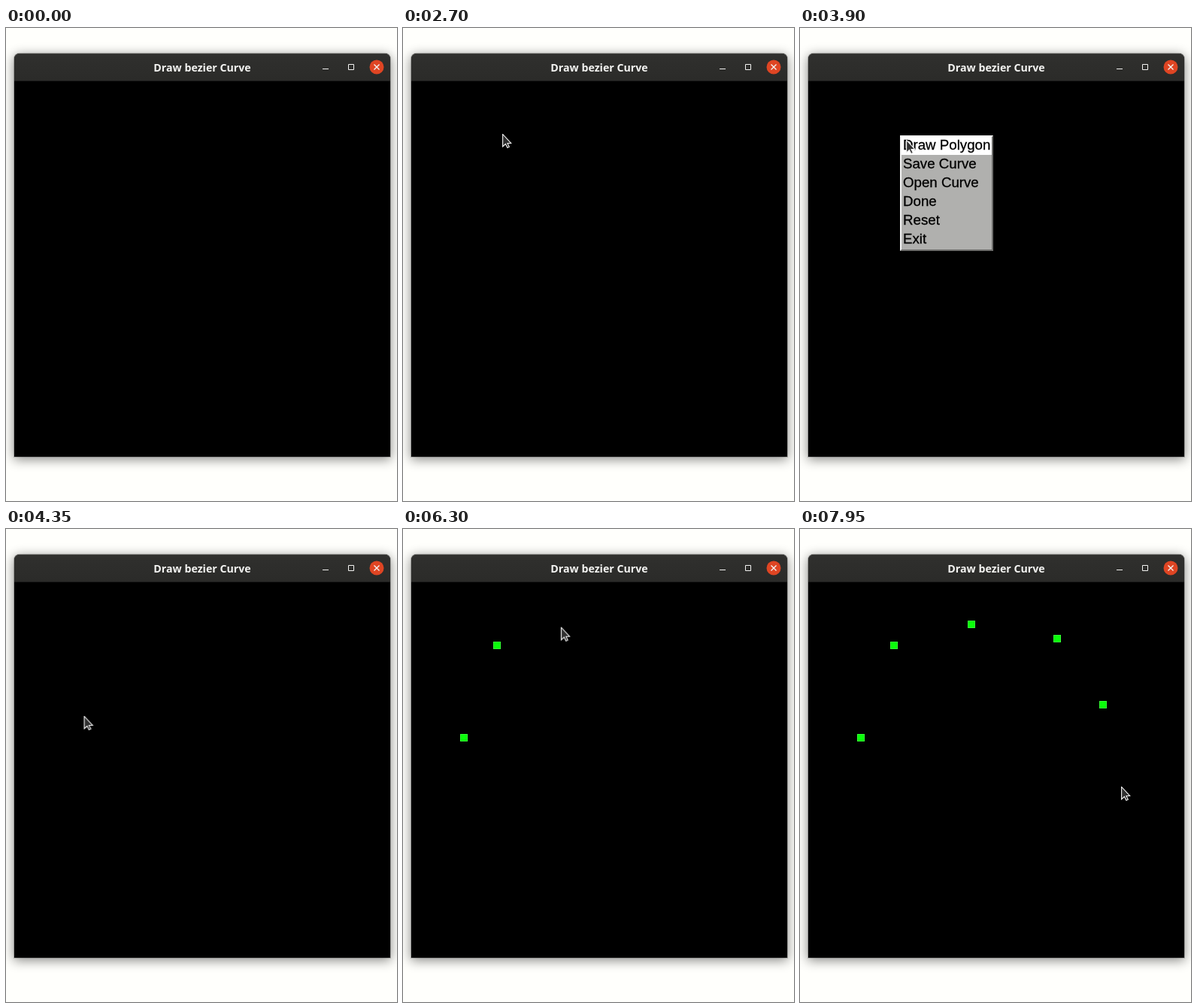
Animation, 520 px wide and 630 px high, one loop 8 s. Source, as an HTML page:

```html
<!DOCTYPE html>
<html lang="en">
<head>
<meta charset="utf-8">
<title>Draw bezier Curve</title>
<style>
  html, body { margin: 0; width: 100%; height: 100%; overflow: hidden; background: #fffffc; }
  .window {
    position: absolute; left: 11px; top: 34px; width: 500px; height: 537px;
    background: #000; border-radius: 7px 7px 0 0;
    box-shadow: 0 0 0 1px rgba(0, 0, 0, .22), 0 3px 15px 1px rgba(0, 0, 0, .45);
  }
  .bar {
    height: 36px; border-radius: 7px 7px 0 0;
    background: linear-gradient(#30302e, #2b2b29);
    box-shadow: inset 0 1px #3e3e3b, 0 1px #1b1b1a;
    color: #f4f4f2; text-align: center;
    font: 700 14.2px/37px "Noto Sans", "Open Sans", sans-serif;
  }
  svg { position: absolute; left: 0; top: 0; }
  .menu {
    position: absolute; left: 133px; top: 143px; width: 120px; height: 150px;
    border: 2px solid; border-color: #f4f4f4 #6c6c6a #6c6c6a #f4f4f4;
    background: #b0b0ae; color: #000; opacity: 0;
    font: 18.7px/25px "Liberation Sans", Arial, sans-serif;
    -webkit-text-stroke: .3px #000;
  }
  .menu div { position: relative; top: -2px; height: 25px; padding-left: 2px; white-space: nowrap; }
  .glow { position: absolute; left: 0; top: 0; width: 120px; height: 24px; background: #fff; opacity: 0; }
  .dot { fill: #0aff0a; stroke: #34ff34; opacity: 0; }
  #cursor { opacity: 0; }
</style>
</head>
<body>
<div class="window"><div class="bar">Draw bezier Curve</div></div>

<svg width="520" height="630">
  <g fill="none" stroke="#f4f4f2">
    <path d="M421 54.5h8"/>
    <path d="M455.5 48.5h7v7h-7z"/>
    <circle cx="493" cy="52" r="9.5" fill="#df4523" stroke="none"/>
    <path d="M489.5 48.5l7 7m0-7l-7 7" stroke-width="1.4"/>
  </g>
  <g id="dots"></g>
</svg>

<div class="menu" id="menu"><span class="glow" id="glow"></span></div>

<svg id="cursor" width="16" height="22">
  <path d="M.6 .5v16.4l3.8-3.4 2.5 5 2.4-1.2-2.3-4.8h4.7z"
        fill="#303030" stroke="#f5f5f5" stroke-width="1.1"/>
</svg>

<script>
const LOOP = 8000, TICK = 50;
const $ = id => document.getElementById(id);
const play = (el, frames) => el.animate(frames, { duration: LOOP, iterations: Infinity });

// Hard switch: visible from start to end.
function show(el, start, end = LOOP) {
  const key = (time, opacity) => ({ offset: time / LOOP, opacity, easing: 'step-end' });
  const last = end < LOOP ? [key(end, 0), key(LOOP, 0)] : [key(LOOP, 1)];
  play(el, [key(0, 0), key(start, 1), ...last]);
}

// Rest at each stop, then move straight to the next, one step per tick.
function travel(el, stops) {
  play(el, stops.flatMap(({ x, y, arrive, leave }, i) => {
    const transform = `translate(${x}px, ${y}px)`;
    const next = stops[i + 1];
    const ticks = next ? (next.arrive - leave) / TICK : 1;
    return [
      { offset: arrive / LOOP, transform },
      { offset: leave / LOOP, transform, easing: `steps(${ticks}, end)` }
    ];
  }));
}

function addDot({ x, y, leave }) {
  const dot = document.createElementNS('http://www.w3.org/2000/svg', 'rect');
  const attrs = { class: 'dot', x: x - 3.5, y: y - 3.5, width: 9, height: 9 };
  for (const name in attrs) dot.setAttribute(name, attrs[name]);
  $('dots').append(dot);
  show(dot, leave);
}

for (const label of ['Draw Polygon', 'Save Curve', 'Open Curve', 'Done', 'Reset', 'Exit']) {
  const row = document.createElement('div');
  row.textContent = label;
  $('menu').append(row);
}

const stop = (x, y, arrive, leave = arrive) => ({ x, y, arrive, leave });
const opening = stop(56, 216, 0, 1800);
const corner = stop(132, 141, 2450, 3100);
const item = stop(141, 149, 3300, 4150);
const swing = stop(66, 349, 4550);
const clicks = [
  stop(80, 277, 4850, 5150),
  stop(124, 154, 5950, 6050),
  stop(227, 126, 6350, 6500),
  stop(341, 145, 6800, 7000),
  stop(402, 233, 7450, 7650)
];
const finish = stop(427, 343, 7950, LOOP);

travel($('cursor'), [opening, corner, item, swing, ...clicks, finish]);
clicks.forEach(addDot);
show($('cursor'), opening.leave);
show($('menu'), 2750, 4000);
show($('glow'), 3150, 4000);
</script>
</body>
</html>
```
